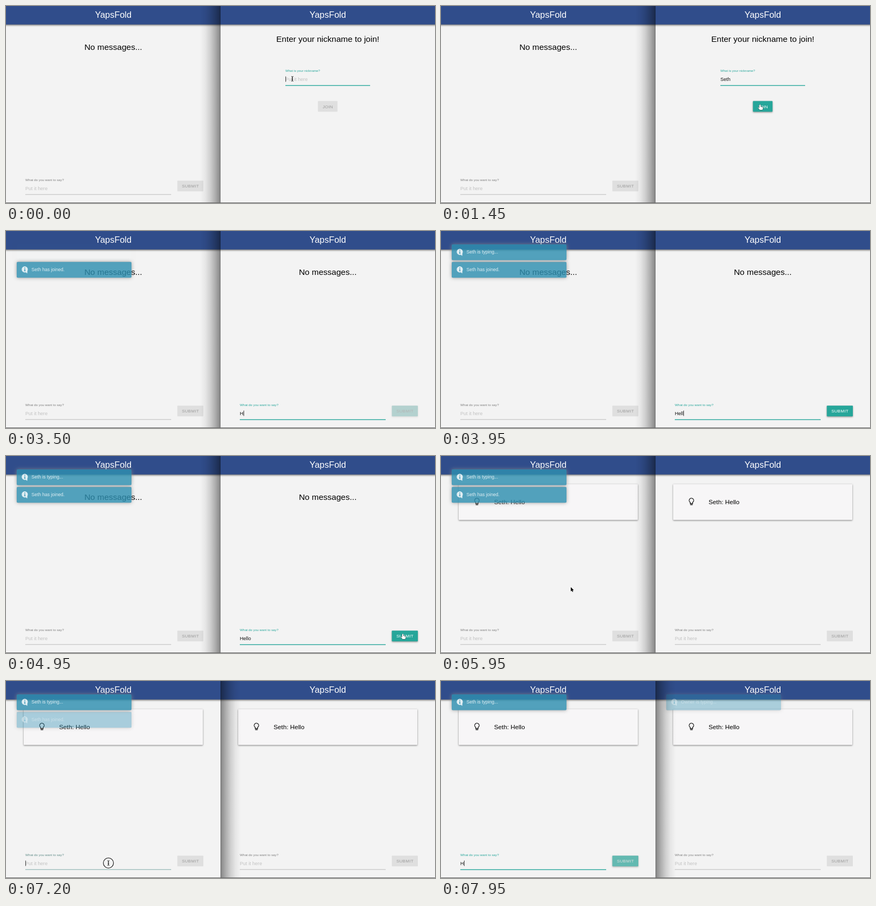
These frames come from a looping animation (800x368 px, 8 s). An HTML page with a canvas:

```html
<!DOCTYPE html>
<html lang="en">
<head>
<meta charset="utf-8">
<title>Chat demo</title>
<style>
html, body { margin: 0; width: 100%; height: 100%; overflow: hidden; background: #f3f3f3; }
canvas { display: block; width: 800px; height: 368px; }
</style>
</head>
<body>
<canvas id="stage"></canvas>
<script>
const W = 800, H = 368, HALF = 400, LOOP = 8000;
const FONT = '"Liberation Sans", Arial, sans-serif';
const APP = 'YapsFold', GUEST = 'Seth', HOST = 'Owner';
const TEAL = [38, 166, 154], GREY = [223, 223, 223];

const T = {
  name: [180, 350, 480, 620],
  joined: 1520,
  focusRight: 2720,
  hello: [3450, 3640, 3800, 3950, 4120],
  sent: 5140,
  activateLeft: 6620,
  focusLeft: 7140,
  reply: [7780]
};
const CLICKS = [1470, 2700, 5040, 6600, 7130];
const PATH = [
  [0, 534, 136], [820, 534, 136], [1250, 595, 184], [1620, 595, 184],
  [2400, 530, 357], [2680, 500, 341], [4320, 500, 341], [4820, 740, 332],
  [5240, 740, 332], [5950, 242, 245], [6500, 191, 340], [LOOP, 191, 340]
];
const HIDDEN = [[170, 820], [3440, 4320], [7770, LOOP]];

const canvas = document.getElementById('stage');
const ctx = canvas.getContext('2d');
const dpr = window.devicePixelRatio || 1;
canvas.width = W * dpr;
canvas.height = H * dpr;

const clamp = v => Math.max(0, Math.min(1, v));
const ramp = (t, start, ms) => clamp((t - start) / ms);
const swing = p => 0.5 - Math.cos(Math.PI * p) / 2;
const easeOut = p => 1 - (1 - p) * (1 - p);
const rgb = (a, b, p) => `rgb(${a.map((v, i) => Math.round(v + (b[i] - v) * p))})`;
const typed = (word, times, t) => word.slice(0, times.filter(k => t >= k).length);

function text(s, x, y, size, color, align = 'left', spacing = 0) {
  ctx.font = `${size}px ${FONT}`;
  ctx.letterSpacing = spacing + 'px';
  ctx.textAlign = align;
  ctx.fillStyle = color;
  ctx.fillText(s, x, y);
}

function box(x, y, w, h, r) {
  ctx.beginPath();
  ctx.roundRect(x, y, w, h, r);
}

function shadow(color, blur, dy) {
  ctx.shadowColor = color;
  ctx.shadowBlur = blur * dpr;
  ctx.shadowOffsetY = dy * dpr;
}

function header() {
  ctx.save();
  shadow('rgba(0,0,0,.55)', 3, 1);
  ctx.fillStyle = '#304d8b';
  ctx.fillRect(-8, -4, HALF + 16, 38.5);
  ctx.restore();
  text(APP, 200, 22.3, 16.4, '#fff', 'center');
}

function button(label, x, y, w, on) {
  const p = easeOut(on);
  ctx.save();
  shadow(`rgba(0,0,0,${0.4 * p})`, 3, 1.2);
  ctx.fillStyle = rgb(GREY, TEAL, p);
  box(x, y, w, 20, 1);
  ctx.fill();
  ctx.restore();
  text(label, x + w / 2 + 0.1, y + 12.9, 8, rgb([155, 155, 155], [255, 255, 255], p), 'center', 0.28);
}

function field(f) {
  const p = easeOut(f.focus);
  text(f.label, f.x, f.y - 13.2, f.labelSize, rgb([125, 125, 125], TEAL, p));
  text(f.value || 'Put it here', f.x, f.y + 3.2, 9.1, f.value ? '#111' : '#c3c3c3');
  ctx.fillStyle = rgb([172, 172, 172], TEAL, p);
  ctx.fillRect(f.x, f.y + 11.2, f.w, 0.8 + 0.6 * p);
  if (f.caret) {
    const cx = f.x + (f.value ? ctx.measureText(f.value).width + 0.4 : 0.2);
    ctx.fillStyle = '#222';
    ctx.fillRect(cx, f.y - 5, 0.9, 10);
  }
}

function bulb(x, y) {
  ctx.strokeStyle = '#111';
  ctx.lineWidth = 1.3;
  ctx.beginPath();
  ctx.arc(x, y, 4.2, 0.68 * Math.PI, 2.32 * Math.PI);
  ctx.lineTo(x + 2.2, y + 6);
  ctx.lineTo(x - 2.2, y + 6);
  ctx.closePath();
  ctx.stroke();
  ctx.fillStyle = '#111';
  ctx.fillRect(x - 2.3, y + 7.4, 4.6, 1.3);
}

function card() {
  ctx.save();
  shadow('rgba(0,0,0,.5)', 3, 1);
  ctx.fillStyle = '#f7f6f7';
  box(33, 52.5, 334, 67, 1);
  ctx.fill();
  ctx.restore();
  bulb(67, 83);
  text(`${GUEST}: Hello`, 99, 89.6, 11.75, '#000');
}

function toast(message, y, visible) {
  if (visible <= 0) return;
  const x = 20, w = 214, h = 29.5;
  ctx.save();
  ctx.globalAlpha = 0.82 * visible;
  ctx.save();
  ctx.beginPath();
  ctx.rect(0, 0, HALF, H);
  ctx.roundRect(x, y, w, h, 2);
  ctx.clip('evenodd');
  shadow('#888', 7, 0);
  ctx.fillStyle = '#888';
  box(x, y, w, h, 2);
  ctx.fill();
  ctx.restore();

  ctx.fillStyle = '#2f8fb0';
  box(x, y, w, h, 2);
  ctx.fill();
  ctx.fillStyle = '#fff';
  ctx.beginPath();
  ctx.arc(35, y + 14, 5.7, 0, 2 * Math.PI);
  ctx.moveTo(35, y + 18);
  ctx.lineTo(40, y + 16);
  ctx.lineTo(39.6, y + 21.5);
  ctx.fill();
  ctx.fillStyle = '#2f8fb0';
  ctx.fillRect(34.3, y + 10.2, 1.6, 1.6);
  ctx.fillRect(34.3, y + 12.8, 1.6, 4.4);
  ctx.fillRect(33.6, y + 16.4, 3, 0.9);
  text(message, 47.6, y + 17.4, 8.6, '#fff');
  ctx.restore();
}

function chatRoom(t, chat) {
  header();
  if (t >= T.sent) card();
  else text('No messages...', 200, 82.4, 15.5, '#000', 'center');
  field({ label: 'What do you want to say?', labelSize: 6.25, x: 36, y: 340.5, w: 272, ...chat });
  button('SUBMIT', 319.5, 326.3, 48.5, chat.on);
}

function joinPage(t) {
  header();
  text('Enter your nickname to join!', 200, 67.3, 15.5, '#000', 'center');
  const value = typed(GUEST, T.name, t);
  field({
    label: 'What is your nickname?', labelSize: 6.05, x: 121, y: 136.6, w: 158,
    value, focus: 1, caret: t < 1150
  });
  button('JOIN', 181.7, 177.6, 36.5, ramp(t, T.name[0], 300));
}

function leftPanel(t) {
  chatRoom(t, {
    value: typed('H', T.reply, t),
    focus: ramp(t, T.focusLeft, 320),
    caret: t >= T.focusLeft && (t < 7620 || t >= T.reply[0]),
    on: ramp(t, T.reply[0], 400)
  });
  const pushed = t >= T.hello[0] + 20;
  const joined = swing(ramp(t, T.joined, 300)) * (1 - swing(ramp(t, 6690, 1000)));
  toast(`${GUEST} has joined.`, pushed ? 57.8 : 25, joined);
  toast(`${GUEST} is typing...`, 25, swing(ramp(t, T.hello[0] + 40, 300)));
}

function rightPanel(t) {
  if (t < T.joined) return joinPage(t);
  const open = t < T.sent;
  chatRoom(t, {
    value: open ? typed('Hello', T.hello, t) : '',
    focus: open ? ramp(t, T.focusRight, 300) : 1 - ramp(t, T.sent, 300),
    caret: t >= T.focusRight && t < 4600 && !(t > 3200 && t < T.hello[0]),
    on: open ? ramp(t, T.hello[0], 400) : 1 - ramp(t, T.sent, 300)
  });
  toast(`${HOST} is typing...`, 25, swing(ramp(t, T.reply[0] + 30, 300)));
}

function panel(x, draw, t) {
  ctx.save();
  ctx.translate(x, 0);
  ctx.beginPath();
  ctx.rect(0, 0, HALF, H);
  ctx.clip();
  draw(t);
  ctx.restore();
}

// The active window casts its shadow over the other one.
function windowEdge(t) {
  const dir = t < T.activateLeft ? -1 : 1;
  const g = ctx.createLinearGradient(HALF, 0, HALF + dir * 38, 0);
  [0.46, 0.29, 0.15, 0.05, 0].forEach((a, i) => g.addColorStop(i / 4, `rgba(0,0,0,${a})`));
  ctx.fillStyle = g;
  ctx.fillRect(dir < 0 ? HALF - 38 : HALF, 0, 38, H);
  ctx.fillStyle = 'rgba(0,0,0,.3)';
  ctx.fillRect(dir < 0 ? HALF - 0.5 : HALF, 0, 0.6, H);
  ctx.fillStyle = '#666';
  ctx.fillRect(0, H - 1, W, 1);
}

function cursorAt(t) {
  const i = PATH.findIndex(k => t < k[0]);
  const [t0, x0, y0] = PATH[i - 1], [t1, x1, y1] = PATH[i];
  const p = swing((t - t0) / (t1 - t0));
  return [x0 + (x1 - x0) * p, y0 + (y1 - y0) * p];
}

function cursorKind(x, y, t) {
  const inside = (l, top, r, b) => x >= l && x <= r && y >= top && y <= b;
  if (t < T.joined) {
    if (inside(521, 125, 679, 149)) return 'beam';
    if (inside(582, 178, 618, 198)) return 'hand';
  } else {
    if (inside(36, 328, 308, 353) || inside(436, 328, 708, 353)) return 'beam';
    if (inside(719, 326, 768, 347)) return 'hand';
  }
  return 'arrow';
}

const SHAPES = {
  beam: new Path2D('M-2 -4.5Q0 -4.5 0 -3V3Q0 4.5 -2 4.5M2 -4.5Q0 -4.5 0 -3V3Q0 4.5 2 4.5M-1.2 1H1.2'),
  arrow: new Path2D('M0 0V8L1.9 6.3L3.1 9L4.5 8.4L3.3 5.8H5.8Z'),
  hand: new Path2D('M-1 1Q0 -.8 1 1V4L5 5Q5.8 5.4 5.4 7L4.4 10H-.5L-3.2 6.6Q-3.2 5.2 -2 5.6L-1 6.5Z')
};

function cursor(t) {
  if (HIDDEN.some(([a, b]) => t >= a && t < b)) return;
  const [x, y] = cursorAt(t);
  const kind = cursorKind(x, y, t);
  ctx.save();
  ctx.translate(x, y);
  ctx.lineJoin = 'round';
  if (CLICKS.some(c => t >= c && t < c + 180)) {
    ctx.strokeStyle = '#111';
    ctx.lineWidth = 1.1;
    ctx.beginPath();
    ctx.arc(0, 0, 9.5, 0, 2 * Math.PI);
    ctx.stroke();
  }
  ctx.strokeStyle = kind === 'arrow' ? '#fff' : '#222';
  ctx.lineWidth = kind === 'arrow' ? 1.2 : 0.9;
  ctx.stroke(SHAPES[kind]);
  if (kind !== 'beam') {
    ctx.fillStyle = kind === 'hand' ? '#fff' : '#000';
    ctx.fill(SHAPES[kind]);
  }
  ctx.restore();
}

function frame() {
  const t = performance.now() % LOOP;
  ctx.setTransform(dpr, 0, 0, dpr, 0, 0);
  ctx.fillStyle = '#f3f3f3';
  ctx.fillRect(0, 0, W, H);
  panel(0, leftPanel, t);
  panel(HALF, rightPanel, t);
  windowEdge(t);
  cursor(t);
  requestAnimationFrame(frame);
}
frame();
</script>
</body>
</html>
```
